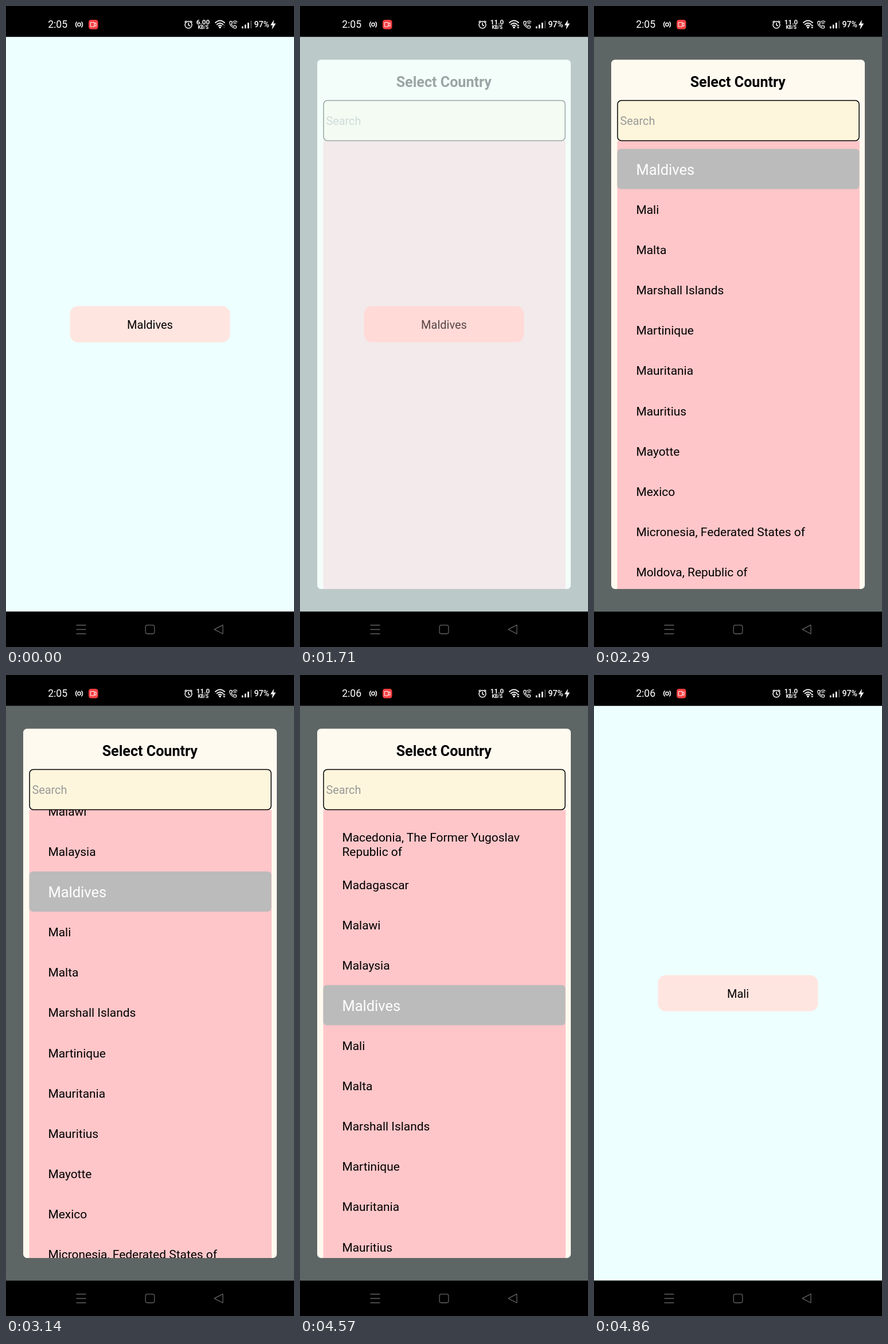
An HTML page for the animation above (5280 ms loop, 502 px wide and 1116 px high).

```html
<!DOCTYPE html>
<html lang="en">
<head>
<meta charset="utf-8">
<title>Country picker</title>
<style>
  html, body { margin: 0; width: 100%; height: 100%; overflow: hidden; background: #000; }
  svg { display: block; width: 100%; height: 100%; }
  text { font-family: Roboto, sans-serif; white-space: pre; }
  .line { fill: none; stroke: #fff; stroke-width: 1.5; stroke-linecap: round; stroke-linejoin: round; }
  .nav { fill: none; stroke: #626262; stroke-width: 1.3; stroke-linejoin: round; }
  .white { fill: #fff; }
  .mid { text-anchor: middle; }
</style>
</head>
<body>
<svg viewBox="0 0 502 1116">
  <defs>
    <clipPath id="listClip"><rect x="40" y="235" width="423" height="780"/></clipPath>
  </defs>

  <!-- page -->
  <rect y="53.5" width="502" height="1001" fill="#eeffff"/>
  <rect x="111.5" y="522.5" width="279" height="63" rx="14" fill="#ffe5e0"/>
  <text id="choice" class="mid" x="251" y="561.8" font-size="20">Maldives</text>

  <!-- modal -->
  <g id="modal">
    <rect y="53.5" width="502" height="1001" fill="#000" fill-opacity=".605"/>
    <rect x="30" y="93.5" width="442" height="921.5" rx="6.5" fill="#fffaf0"/>
    <text class="mid" x="250.8" y="140.5" font-size="25.1" font-weight="700">Select Country</text>
    <rect x="40.5" y="235" width="422.5" height="780" fill="#ffc6c9"/>
    <g clip-path="url(#listClip)"><g id="list"></g></g>
    <rect x="41.1" y="164.5" width="421" height="70" rx="6.5" fill="#fef6dc" stroke="#000" stroke-width="1.5"/>
    <text x="45.4" y="206.5" font-size="19.9" fill="#999">Search</text>
  </g>

  <!-- status bar -->
  <rect width="502" height="53.5"/>
  <g class="white">
    <text id="clock" x="73.2" y="38.4" font-size="17.6">2:05</text>
    <text id="speed" class="mid" x="343.5" y="32.3" font-size="11.6" font-weight="700">6.00</text>
    <text class="mid" x="343.7" y="40" font-size="8.2" font-weight="700">KB/S</text>
    <text x="432.4" y="37" font-size="14.2" font-weight="500">97%</text>
    <path d="M467 24 L461 33.5 H464.8 L463.6 41 L470.3 30.6 H466.2 Z"/>
    <path d="M411 35.5h2.6v3.5h-2.6zM416 32.5h2.6v6.5h-2.6zM421 29h2.6v10h-2.6z"/>
    <path d="M426 25.5h2.6v13.500h-2.6z" fill="#444"/>
    <circle cx="373" cy="37.2" r="1.8"/>
  </g>
  <g class="line">
    <circle cx="127.500" cy="32.300" r="2.7"/>
    <path d="M123.200 27.800 Q119.800 32.300 123.200 36.800 M131.800 27.800 Q135.200 32.300 131.800 36.800"/>
    <circle cx="318" cy="32.8" r="6"/>
    <path d="M318 29.500 V33 L320.300 34.500 M311.800 28 L314 26 M324.200 28 L322 26"/>
    <path d="M365 29 Q373 21.800 381 29 M367.600 32 Q373 27.400 378.400 32 M370.200 34.700 Q373 32.400 375.800 34.700" stroke-width="1.8"/>
    <path d="M391.200 26.500 L393.400 26.800 L394.200 30 L392.800 31.500 Q394 34.400 396.800 35.600 L398.300 34.200 L401.500 35.200 L401.600 37.600 Q400.500 39 398.500 38.600 Q391 36.500 389.700 29 Q389.700 27 391.200 26.500 Z" stroke-width="1.3"/>
    <path d="M395.500 27.500 Q399 24.800 402.700 27.500 M397 29.800 Q399 28.300 401.200 29.800 M399.100 31.500 V31.600" stroke-width="1.3"/>
  </g>
  <path id="traffic" d="M378 35 L380.200 32.300 L382.400 35 Z M378 36.500 L380.200 39.200 L382.400 36.500 Z"/>
  <rect x="144" y="24" width="16.500" height="16.500" rx="4.200" fill="#f43f42"/>
  <path class="line" d="M147.700 28.600 H154 V36 H147.700 Z M154 31 L157 29.300 V35.300 L154 33.600" style="stroke-width:1"/>

  <!-- navigation bar -->
  <rect y="1054.5" width="502" height="61.5"/>
  <path class="nav" d="M122.500 1078h17M122.500 1085.500h17M122.500 1093h17"/>
  <rect class="nav" x="243.200" y="1077.800" width="15.600" height="15.200" rx="3.200"/>
  <path class="nav" d="M363 1085.400 L378 1077.700 V1093 Z"/>
</svg>

<script>
const LOOP = 5280, ROW = 70.1, TOP = 248.7;
const $ = id => document.getElementById(id);

const before = ["Macao", "Macedonia, The Former Yugoslav|Republic of", "Madagascar", "Malawi", "Malaysia"];
const after = ["Mali", "Malta", "Marshall Islands", "Martinique", "Mauritania", "Mauritius", "Mayotte",
  "Mexico", "Micronesia, Federated States of", "Moldova, Republic of"];

function add(tag, attrs, label = "") {
  const node = document.createElementNS("http://www.w3.org/2000/svg", tag);
  for (const key in attrs) node.setAttribute(key, attrs[key]);
  node.textContent = label;
  $("list").append(node);
}

function addRow(name, index) {
  const picked = name === "Maldives";
  const size = picked ? 25.5 : 20.95;
  const top = TOP + index * ROW;
  if (picked) add("rect", { x: 40.5, y: top, width: 422, height: ROW, rx: 6.5, fill: "#bbb" });
  const lines = name.split("|"), step = size * 1.172;
  lines.forEach((label, i) => add("text", {
    x: 73.4,
    y: top + ROW / 2 + size * 0.3925 + (i - (lines.length - 1) / 2) * step,
    "font-size": size,
    fill: picked ? "#fff" : "#000"
  }, label));
}

[...before, "Maldives", ...after].forEach((name, i) => addRow(name, i - before.length));

// Tracks of [start time, value]; each value holds until the next.
const tracks = {
  clock: [[0, "2:05"], [4140, "2:06"]],
  speed: [[0, "6.00"], [1140, "11.0"]],
  choice: [[0, "Maldives"], [4710, "Mali"]],
  traffic: [[0, "#3a3a3a"], [1570, "#fff"]],
  modal: [[0, 0], [1710, 0.35], [1860, 1], [4710, 0.5], [4860, 0]],
  list: [[0, 0], [2000, 0.85], [2140, 1]],
  scroll: [[0, 0], [3140, 93.2], [3290, 263], [3430, 274], [3570, 289], [3710, 291]]
};

const at = (name, t) => tracks[name].findLast(([start]) => start <= t)[1];

function draw(t) {
  for (const id of ["clock", "speed", "choice"]) {
    const label = at(id, t);
    if ($(id).textContent !== label) $(id).textContent = label;
  }
  $("traffic").setAttribute("fill", at("traffic", t));
  $("modal").setAttribute("opacity", at("modal", t));
  $("list").setAttribute("opacity", at("list", t));
  $("list").setAttribute("transform", `translate(0 ${at("scroll", t)})`);
}

const begin = performance.now();
function tick() {
  draw((performance.now() - begin) % LOOP);
  requestAnimationFrame(tick);
}
tick();
</script>
</body>
</html>
```
